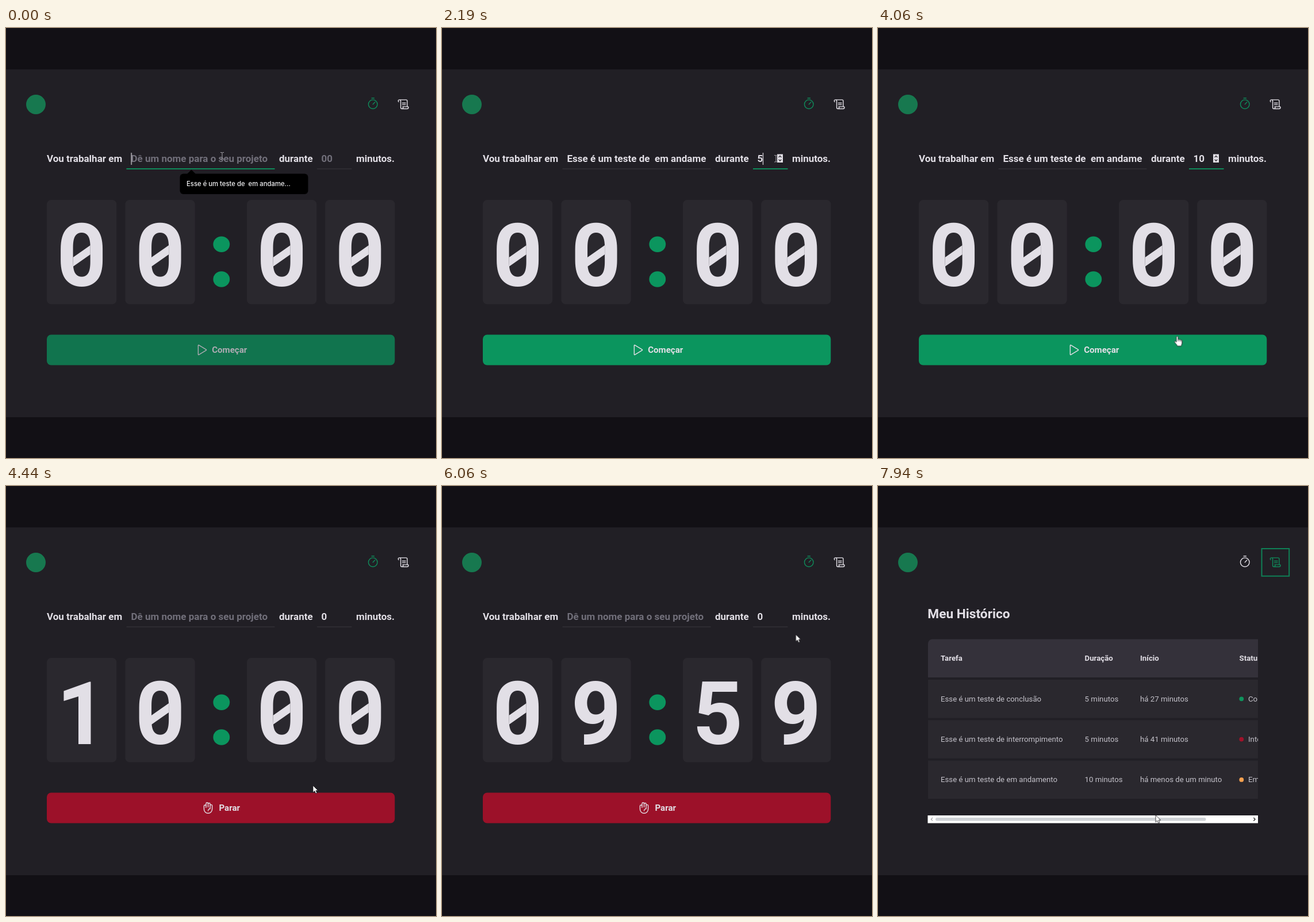
An HTML page that plays this animation: 748x748 px, repeating every 8000 ms.

```html
<!DOCTYPE html>
<html lang="pt-BR">
<head>
<meta charset="utf-8">
<title>Timer</title>
<style>
html, body { margin: 0; width: 100%; height: 100%; overflow: hidden; background: #121015; }
svg { display: block; width: 100vw; height: 100vh; }
text { font-family: Roboto, sans-serif; white-space: pre; }
.form { font-size: 17px; font-weight: 700; fill: #e2dfe6; }
.hint { fill: #716f7a; }
.label { font-size: 15.12px; font-weight: 700; fill: #e2dfe6; }
.title { font-size: 22.7px; font-weight: 700; fill: #e2dfe6; }
.head { font-size: 13.23px; font-weight: 700; fill: #e2dfe6; }
.cell { font-size: 13.23px; fill: #c3c1c9; }
.digit { font-size: 152px; font-weight: 700; fill: #e2dfe6; text-anchor: middle; }
.system { font-family: Inter, sans-serif; }
.icon { fill: none; stroke: #e2dfe6; stroke-width: 16; stroke-linecap: round; stroke-linejoin: round; }
.green { stroke: #0f8a5a; }
.tile { fill: #2a282e; }

/* Every state is an opacity window on the same 8 s clock. */
.s { animation: 8s step-end infinite; }
.empty { animation-name: empty; }
.filled { animation-name: filled; }
.suggest { animation-name: suggest; }
.project-focus { animation-name: project-focus; }
.minutes-focus { animation-name: minutes-focus; }
.no-minutes { animation-name: no-minutes; }
.five { animation-name: five; }
.ten { animation-name: ten; }
.running { animation-name: running; }
.start { animation-name: start; }
.idle { animation-name: idle; }
.t1000 { animation-name: t1000; }
.t0959 { animation-name: t0959; }
.t0958 { animation-name: t0958; }
.timer-page { animation-name: timer-page; }
.history-page { animation-name: history-page; }
.hover { animation-name: hover; }
.status { animation-name: status; }
.beam { animation-name: beam; }
.arrow { animation-name: arrow; }
.hand { animation-name: hand; }
.caret { animation-name: caret; }
.pointer { animation: pointer 8s ease-in-out infinite; }

@keyframes empty { 0% { opacity: 1 } 10.6% { opacity: 0 } 53% { opacity: 1 } }
@keyframes filled { 0% { opacity: 0 } 10.6% { opacity: 1 } 53% { opacity: 0 } }
@keyframes suggest { 0% { opacity: 1 } 10.6% { opacity: 0 } }
@keyframes project-focus { 0% { opacity: 1 } 21.25% { opacity: 0 } }
@keyframes minutes-focus { 0% { opacity: 0 } 21.25% { opacity: 1 } 53% { opacity: 0 } }
@keyframes no-minutes { 0% { opacity: 1 } 25% { opacity: 0 } }
@keyframes five { 0% { opacity: 0 } 25% { opacity: 1 } 31.875% { opacity: 0 } }
@keyframes ten { 0% { opacity: 0 } 31.875% { opacity: 1 } 53% { opacity: 0 } }
@keyframes running { 0% { opacity: 0 } 53% { opacity: 1 } }
@keyframes start { 0% { opacity: .73 } 10.6% { opacity: 1 } 53% { opacity: 0 } }
@keyframes idle { 0% { opacity: 1 } 53% { opacity: 0 } }
@keyframes t1000 { 0% { opacity: 0 } 53% { opacity: 1 } 65.6% { opacity: 0 } }
@keyframes t0959 { 0% { opacity: 0 } 65.6% { opacity: 1 } 78.1% { opacity: 0 } }
@keyframes t0958 { 0% { opacity: 0 } 78.1% { opacity: 1 } }
@keyframes timer-page { 0% { opacity: 1 } 83.5% { opacity: 0 } }
@keyframes history-page { 0% { opacity: 0 } 83.5% { opacity: 1 } }
@keyframes hover { 0% { opacity: 0 } 79% { opacity: 1 } 88% { opacity: 0 } }
@keyframes status { 0% { opacity: 0 } 79.2% { opacity: 1 } 89.5% { opacity: 0 } }
@keyframes beam { 0% { opacity: 1 } 4.8% { opacity: 0 } 18.2% { opacity: 1 } 39.5% { opacity: 0 } }
@keyframes arrow {
  0% { opacity: 0 } 4.8% { opacity: 1 } 18.2% { opacity: 0 } 39.5% { opacity: 1 }
  48.5% { opacity: 0 } 53.5% { opacity: 1 } 79% { opacity: 0 } 88% { opacity: 1 }
}
@keyframes hand {
  0% { opacity: 0 } 48.5% { opacity: 1 } 53.5% { opacity: 0 } 79% { opacity: 1 } 88% { opacity: 0 }
}
@keyframes caret {
  0% { opacity: 1; transform: translateX(217.5px) }
  6.25% { opacity: 0; transform: translateX(217.5px) }
  10.6% { opacity: 1; transform: translateX(459px) }
  16.85% { opacity: 0; transform: translateX(459px) }
  21.25% { opacity: 1; transform: translateX(549px) }
  25% { opacity: 1; transform: translateX(557.8px) }
  31.25% { opacity: 0; transform: translateX(557.8px) }
  31.875% { opacity: 1; transform: translateX(568px) }
  38.1% { opacity: 0; transform: translateX(568px) }
  44.4% { opacity: 1; transform: translateX(568px) }
  50.6% { opacity: 0; transform: translateX(568px) }
}
@keyframes pointer {
  0%, 2% { transform: translate(376px, 222px) }
  9%, 11.5% { transform: translate(390px, 271px) }
  19.5%, 38% { transform: translate(581px, 227px) }
  49.5%, 53% { transform: translate(520.5px, 536.5px) }
  55.2% { transform: translate(534px, 521px) }
  66% { transform: translate(534px, 521px); animation-timing-function: ease-in }
  75.75% { transform: translate(615px, 259px); animation-timing-function: ease-out }
  80%, 86.3% { transform: translate(695.5px, 133.5px) }
  97%, 100% { transform: translate(483px, 572.5px) }
}
</style>
</head>
<body>
<svg viewBox="0 0 748 748">
  <defs>
    <path id="timer" d="M40,128a88,88,0,1,0,176,0a88,88,0,1,0-176,0M128,128l40-40M104,8h48"/>
    <path id="scroll" d="M104,104h64M104,136h64M32,80s-8-6-8-16a24,24,0,0,1,48,0V192a24,24,0,0,0,48,0c0-10-8-16-8-16H216s8,6,8,16a24,24,0,0,1-24,24H96M48,40H176a24,24,0,0,1,24,24V176"/>
    <path id="play" d="M72,40V216a8,8,0,0,0,12,7l144-88a8,8,0,0,0,0-14L84,33a8,8,0,0,0-12,7Z"/>
    <path id="palm" d="M168,112V84a20,20,0,0,1,40,0v68a80,80,0,0,1-160,0V92a20,20,0,0,1,40,0v28M88,120V44a20,20,0,0,1,40,0v68M128,112V52a20,20,0,0,1,40,0v92a40,40,0,0,0-40,40"/>
    <clipPath id="table"><path d="M87,544V274a7.5,7.5,0,0,1,7.5-7.5H661V544Z"/></clipPath>
  </defs>

  <rect width="748" height="748" fill="#121015"/>
  <rect y="72" width="748" height="605" fill="#211f25"/>
  <circle cx="52" cy="133" r="17" fill="#17784f"/>

  <g class="s timer-page">
    <g class="form">
      <text x="71" y="233.4">Vou trabalhar em</text>
      <text x="475" y="233.4">durante</text>
      <text x="609" y="233.4">minutos.</text>
      <path d="M209.5,245H467.5M541,245H601.5" stroke="#2d2b31" stroke-width="1.9"/>
      <path class="s project-focus" d="M209.5,245H467.5" stroke="#0f8a5a" stroke-width="1.9"/>
      <path class="s minutes-focus" d="M541,245H601.5" stroke="#0f8a5a" stroke-width="1.9"/>
      <text class="s empty hint" x="217.5" y="232.7">Dê um nome para o seu projeto</text>
      <text class="s filled" x="217.5" y="232.7">Esse é um teste de  em andame</text>
      <text class="s no-minutes hint" x="548.6" y="232.7">00</text>
      <text class="s five" x="548.6" y="232.7">5</text>
      <text class="s ten" x="548.6" y="232.7">10</text>
      <text class="s running" x="548.6" y="232.7">0</text>
      <g class="s minutes-focus">
        <rect x="583" y="219.5" width="10" height="14.5"/>
        <path d="M585.7,225l2.3-2.6l2.3,2.6M585.7,228.6l2.3,2.6l2.3-2.6" fill="none" stroke="#2a282e" stroke-width="1.3"/>
      </g>
      <rect class="s caret" y="217" width="1.2" height="21"/>
    </g>

    <g class="tile">
      <rect x="71" y="299" width="121.3" height="181.5" rx="7.5"/>
      <rect x="207.4" y="299" width="121.3" height="181.5" rx="7.5"/>
      <rect x="419" y="299" width="121.3" height="181.5" rx="7.5"/>
      <rect x="555.2" y="299" width="121.3" height="181.5" rx="7.5"/>
    </g>
    <g id="clock"></g>
    <g fill="#0b955e">
      <ellipse cx="374.8" cy="376.2" rx="14.4" ry="13.8"/>
      <ellipse cx="374.8" cy="437" rx="14.4" ry="13.8"/>
    </g>

    <g class="s start">
      <rect x="71" y="533.5" width="605.3" height="53" rx="7.5" fill="#0b955e"/>
      <use href="#play" class="icon" transform="translate(328 548.7) scale(.0886)"/>
      <text class="label" x="358.2" y="565.4">Começar</text>
    </g>
    <g class="s running">
      <rect x="71" y="533.5" width="605.3" height="53" rx="7.5" fill="#9c1129"/>
      <use href="#palm" class="icon" transform="translate(340.2 548.7) scale(.0886)"/>
      <text class="label" x="370.4" y="565.4">Parar</text>
    </g>

    <g class="s suggest">
      <path d="M314.5,254.5l8-8l8,8Z"/>
      <rect x="302.5" y="253.5" width="223" height="35.5" rx="6"/>
      <text class="system" x="314" y="275" font-size="11.3" font-weight="500" fill="#f4f4f6">Esse é um teste de  em andame...</text>
    </g>

    <use href="#timer" class="icon green" transform="translate(626.9 121.3) scale(.0886)"/>
    <use href="#scroll" class="icon" transform="translate(680.2 121.3) scale(.0886)"/>
  </g>

  <g class="s history-page">
    <use href="#timer" class="icon" transform="translate(626.9 121.3) scale(.0886)"/>
    <use href="#scroll" class="icon green" transform="translate(680.2 121.3) scale(.0886)"/>
    <rect x="667.5" y="109" width="47.7" height="47.7" fill="none" stroke="#0f8056" stroke-width="2"/>
    <text class="title" x="86.3" y="230.3">Meu Histórico</text>
    <g id="rows" clip-path="url(#table)">
      <rect x="87" y="266" width="574" height="67" fill="#34313a"/>
    </g>
    <rect x="86.5" y="573" width="574.5" height="13.5" fill="#fff"/>
    <rect x="100" y="577" width="470.5" height="5.4" rx="2.7" fill="#cfd2d6"/>
    <path d="M95,577l-2.6,2.7l2.6,2.7" fill="none" stroke="#a5a5a8" stroke-width="1.3"/>
    <path d="M653.4,577l2.6,2.7l-2.6,2.7" fill="none" stroke="#333" stroke-width="1.5"/>
  </g>

  <rect class="s hover" x="668.5" y="153.3" width="45.7" height="3" fill="#0b955e"/>
  <g class="s status">
    <rect x="-1" y="727.5" width="140.5" height="22" fill="#141217" stroke="#2d2b30"/>
    <text class="system" x="3" y="744.8" font-size="12.1" fill="#c9c7cc">localhost:5173/history</text>
  </g>

  <g class="pointer">
    <path class="s beam" d="M-3,-5.5h2.2l.8,.8l.8-.8h2.2M0,-5v10.5M-3,6h2.2l.8-.8l.8,.8h2.2" fill="none" stroke="#a6a4ab" stroke-width="1"/>
    <path class="s arrow" d="M0,0V12.2L2.9,9.6L4.8,14L7,13L5.1,8.8H8.8Z" fill="#fff" stroke="#17151a" stroke-width=".8"/>
    <g class="s hand" fill="#fff" stroke="#17151a" stroke-width=".8" stroke-linejoin="round">
      <path d="M-1.3,1.2a1.4,1.4,0,0,1,2.8,0V5.5c.4-.9,2.4-.7,2.6,.4c.6-.8,2.2-.5,2.4,.6c.7-.5,1.8-.1,1.8,1V12c0,1.6-1.2,2.4-1.2,4.8H.2C-.1,14.4-3.2,12.4-4.6,9.8c-.6-1.3,.8-2.2,1.9-1.2L-1.3,10Z"/>
      <path d="M1.5,5.5V8.4M4.1,6V8.6M6.5,6.6V8.8" fill="none"/>
    </g>
  </g>
</svg>
<script>
const tileCenters = [131.6, 268, 479.6, 615.8];

// Zeros carry a slash inside the counter.
const digit = (char, i) => {
  const x = tileCenters[i];
  const slash = char === "0" ? `<path d="M${x - 15},399l30,-21v16l-30,21Z" fill="#e2dfe6"/>` : "";
  return `<text class="digit" x="${x}" y="449">${char}</text>${slash}`;
};
const clockStates = { idle: "0000", t1000: "1000", t0959: "0959", t0958: "0958" };
document.getElementById("clock").innerHTML = Object.entries(clockStates)
  .map(([name, time]) => `<g class="s ${name}">${[...time].map(digit).join("")}</g>`)
  .join("");

const columns = [109, 359.6, 456, 628.6];
const cells = (values, y, kind) => values
  .map((value, i) => `<text class="${kind}" x="${columns[i]}" y="${y}">${value}</text>`)
  .join("");
const tasks = [
  ["Esse é um teste de conclusão", "5 minutos", "há 27 minutos", "Concluído", "#0f935d"],
  ["Esse é um teste de interrompimento", "5 minutos", "há 41 minutos", "Interrompido", "#a0122a"],
  ["Esse é um teste de em andamento", "10 minutos", "há menos de um minuto", "Em andamento", "#f9a14f"],
];
const taskRow = ([task, length, began, status, color], i) => {
  const y = 337 + i * 70.3;
  return `<rect class="tile" x="87" y="${y}" width="574" height="66.5"/>
    ${cells([task, length, began], y + 37.8, "cell")}
    <circle cx="632.3" cy="${y + 33.3}" r="3.9" fill="${color}"/>
    <text class="cell" x="644" y="${y + 37.8}">${status}</text>`;
};
document.getElementById("rows").insertAdjacentHTML("beforeend",
  cells(["Tarefa", "Duração", "Início", "Status"], 304.4, "head") + tasks.map(taskRow).join(""));
</script>
</body>
</html>
```
